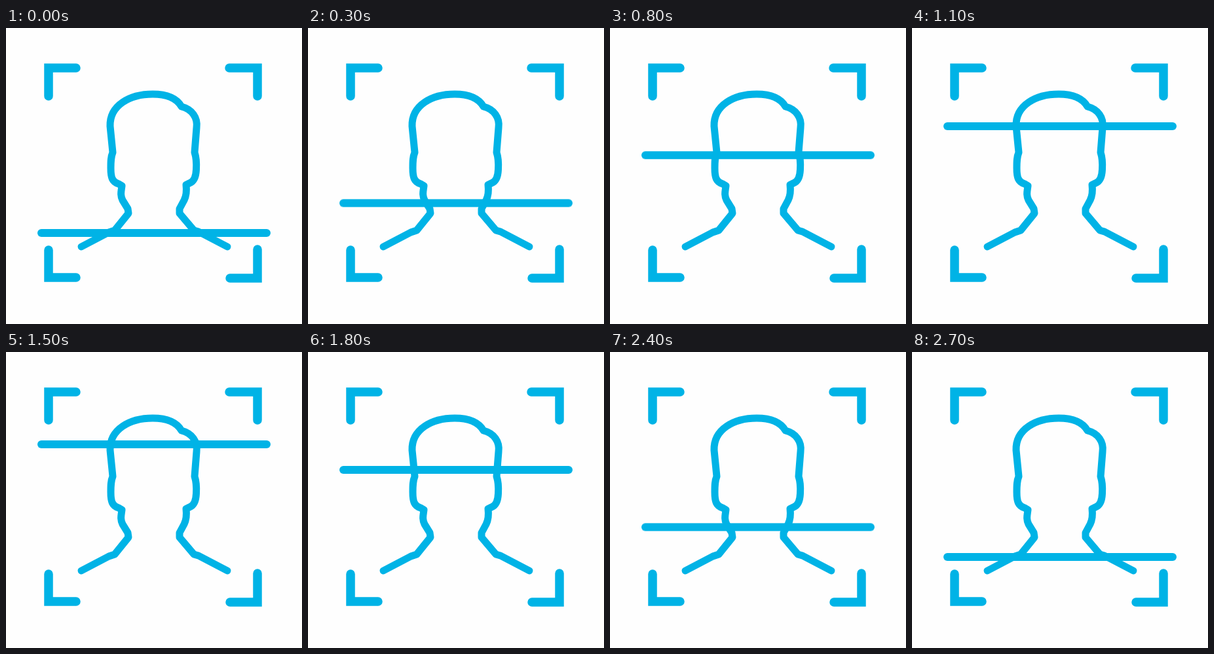
Animation, 452 px wide and 452 px high, one loop 2.9 s. Source, as an HTML page:

```html
<!DOCTYPE html>
<html lang="en">
<head>
<meta charset="utf-8">
<title>Face scan</title>
<style>
  html, body { margin: 0; width: 100%; height: 100%; overflow: hidden; background: #fefefe; }
  svg { display: block; width: 100vw; height: 100vh; }
  path { fill: none; stroke: #00b3e6; stroke-linecap: round; }
  .corners { stroke-width: 13.5; stroke-linejoin: miter; }
  .head { stroke-width: 11; stroke-linejoin: round; }
  .beam { stroke-width: 12; animation: scan 2900ms infinite; }

  /* The beam moves once every 100 ms and rests at both ends. */
  @keyframes scan {
    0%      { transform: translateY(313px); animation-timing-function: steps(5, end); }
    17.241% { transform: translateY(237px); animation-timing-function: steps(4, end); }
    31.034% { transform: translateY(180px); animation-timing-function: steps(2, end); }
    37.931% { transform: translateY(150px); animation-timing-function: steps(1, end); }
    41.379% { transform: translateY(141px); animation-timing-function: steps(1, end); }
    44.827% { transform: translateY(127px); animation-timing-function: steps(1, end); }
    51.724% { transform: translateY(141px); animation-timing-function: steps(1, end); }
    55.172% { transform: translateY(150px); animation-timing-function: steps(2, end); }
    62.068% { transform: translateY(180px); animation-timing-function: steps(4, end); }
    75.862% { transform: translateY(237px); animation-timing-function: steps(5, end); }
    93.103%, 100% { transform: translateY(313px); }
  }
</style>
</head>
<body>
<svg viewBox="0 0 452 452">
  <path class="corners" d="M107 61H65V104 M341 61H384V104 M65 339V381H107 M384 338V382H342"/>
  <path class="head" d="M115 334 L157 312 L166 309 L187 283 L186 276 L178 263
    C174 255 176 249 177 241 L172 238 C162 235 160 228 160 214
    C160 204 160 197 163 190 L159 150 C158 118 189 101 224 101
    C246 101 261 108 268 120 C284 124 293 137 291 152 L288 190
    C291 199 291 207 290.500 216 C290 229 286 235 280 237 L275 239.500
    C276 248 276 255 272 263 L265 276 L265 283 L287 309 L294 311 L338 334"/>
  <path class="beam" d="M54 0H398"/>
</svg>
</body>
</html>
```
